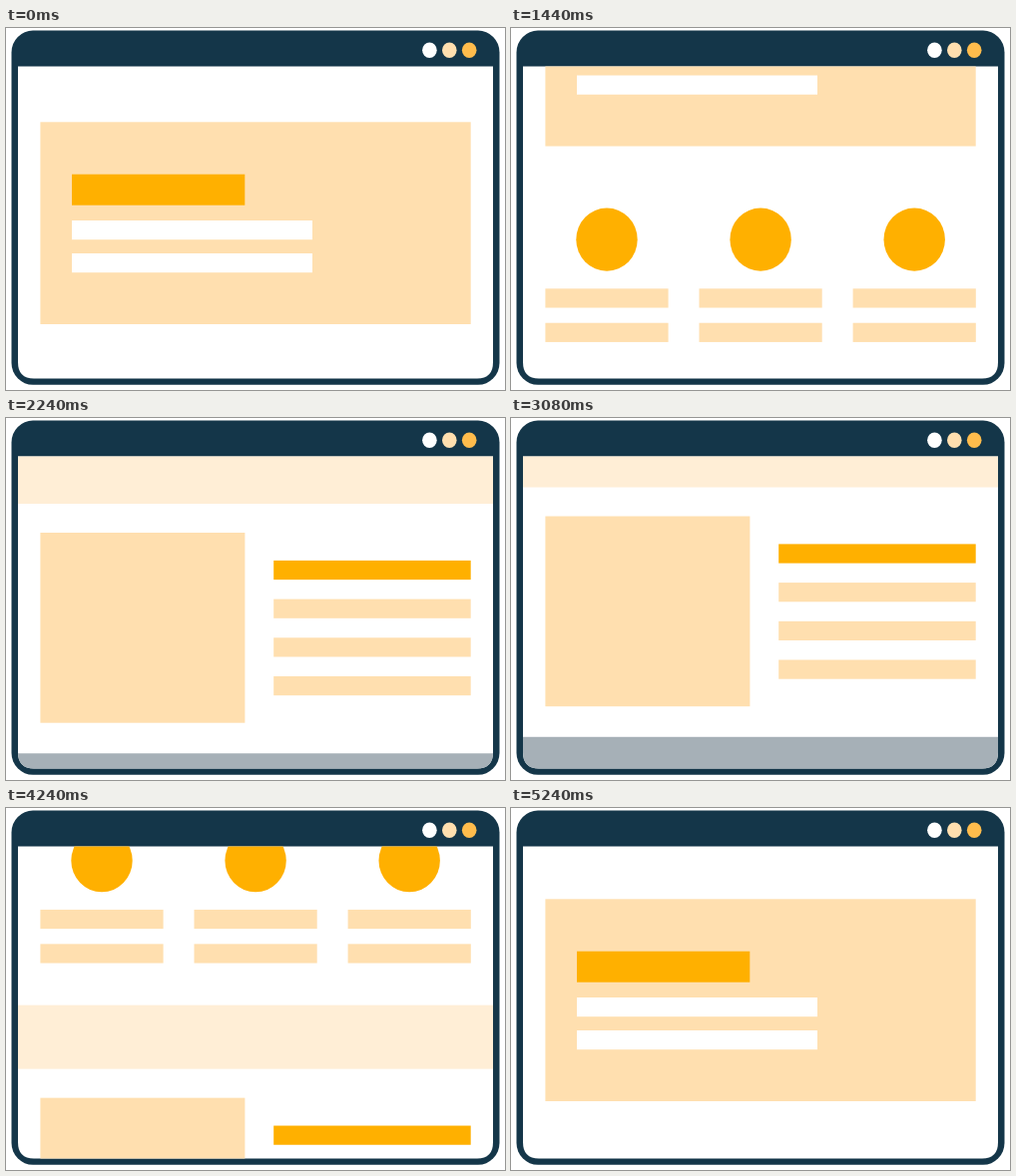
Recreate the animation shown at these times as an HTML page. Size 500 px wide and 363 px high, loop 5280 ms.

```html
<!DOCTYPE html>
<html lang="en">
<head>
<meta charset="utf-8">
<title>Scrolling page</title>
<style>
  html, body { margin: 0; width: 100%; height: 100%; overflow: hidden; background: #fff; }
  svg { display: block; width: 500px; height: 363px; }
</style>
</head>
<body>
<svg viewBox="0 0 500 363">
  <defs>
    <clipPath id="view">
      <path d="M12 38.6H488V335.5Q488 351.4 472 351.4H28Q12 351.4 12 335.5Z"/>
    </clipPath>
  </defs>
  <rect x="5.5" y="2.5" width="489" height="355.3" rx="21.5" ry="22" fill="#143649"/>
  <g clip-path="url(#view)">
    <rect width="500" height="363" fill="#fff"/>
    <g id="page"></g>
  </g>
  <g id="dots"></g>
</svg>
<script>
const LOOP = 5280, STEP = 40;
const PEACH = '#ffdfaf', PALE = '#ffeed6', AMBER = '#ffb000', WHITE = '#fff';
const page = document.getElementById('page');

function add(parent, tag, attrs) {
  const node = document.createElementNS('http://www.w3.org/2000/svg', tag);
  for (const key in attrs) node.setAttribute(key, attrs[key]);
  parent.appendChild(node);
}
const box = (x, y, width, height, fill) => add(page, 'rect', { x, y, width, height, fill });
const oval = (parent, cx, cy, rx, ry, fill) => add(parent, 'ellipse', { cx, cy, rx, ry, fill });

// Hero
box(34.4, 94.3, 431.3, 202.7, PEACH);
box(66, 146.7, 173.3, 31, AMBER);
for (const y of [193, 226]) box(66, y, 241, 19.2, WHITE);

// Three columns
for (let i = 0; i < 3; i++) {
  const x = 34.4 + i * 154.1;
  oval(page, x + 61.6, 390.6, 30.7, 31.6, AMBER);
  for (const y of [439.8, 474.2]) box(x, y, 123.2, 19.2, PEACH);
}

// Band, picture with text lines, footer
box(0, 535.5, 500, 64, PALE);
box(34.4, 628.5, 205, 190.7, PEACH);
for (let i = 0; i < 4; i++) box(268.2, 656.4 + i * 38.7, 197.5, 19.2, i ? PEACH : AMBER);
box(0, 849.8, 500, 80, '#a6b0b7');

const dots = document.getElementById('dots');
[WHITE, PEACH, '#ffbc4c'].forEach((fill, i) => oval(dots, 424.4 + i * 19.9, 22.2, 7.3, 7.7, fill));

// Scroll keys: time, offset, speed in px per ms
const keys = [
  [0, 0, 0], [600, 0, 0], [1120, 42.8, .21], [1720, 344, .56], [2240, 513.5, .11],
  [2650, 530, 0], [3350, 530, 0], [3840, 494, -.18], [4600, 136.5, -.53],
  [5080, 14, -.11], [5240, 3, -.05], [LOOP, 1, -.03]
];

function scrollAt(t) {
  const i = keys.findIndex(key => key[0] > t);
  const [t0, s0, v0] = keys[i - 1], [t1, s1, v1] = keys[i];
  const span = t1 - t0, u = (t - t0) / span, w = 1 - u;
  return s0 * w * w * (1 + 2 * u) + s1 * u * u * (3 - 2 * u)
    + span * u * w * (v0 * w - v1 * u);
}

function draw(now) {
  const t = Math.floor((now % LOOP) / STEP) * STEP;
  page.setAttribute('transform', `translate(0 ${-scrollAt(t).toFixed(2)})`);
}

let start;
function tick(now) {
  start ??= now;
  draw(Math.max(0, now - start));
  requestAnimationFrame(tick);
}
draw(0);
requestAnimationFrame(tick);
</script>
</body>
</html>
```
